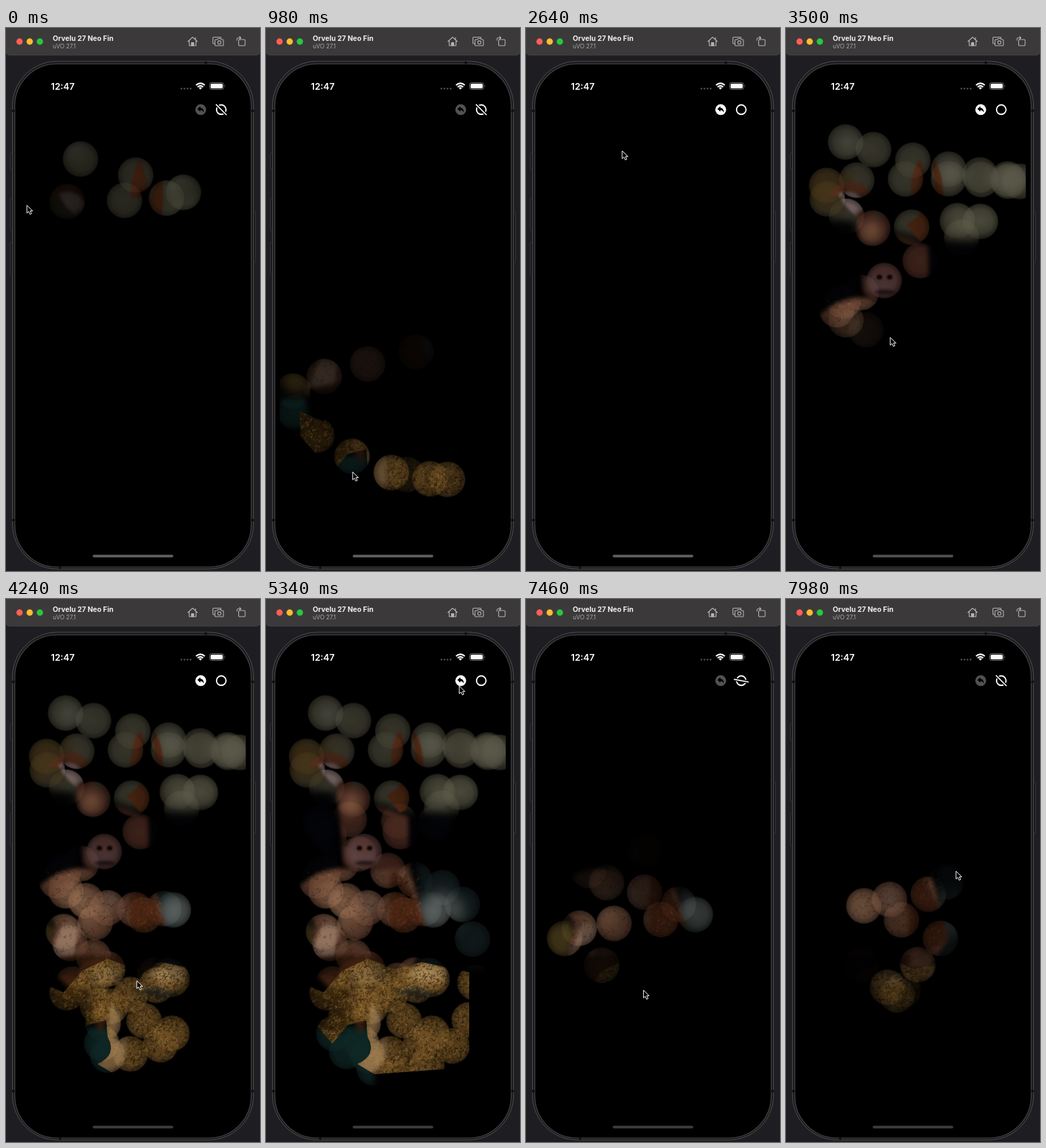
These frames come from a looping animation (375 by 800 pixels, 8 s). An HTML page with a canvas:

```html
<!DOCTYPE html>
<html lang="en">
<head>
<meta charset="utf-8">
<title>Reveal by touch</title>
<style>
  html, body { margin: 0; width: 100%; height: 100%; overflow: hidden; background: #1e1d21; }
  #stage { position: relative; width: 375px; height: 800px; overflow: hidden; }
  #stage > * { position: absolute; left: 0; top: 0; }
  text { font-family: Inter, "Open Sans", sans-serif; }
</style>
</head>
<body>
<div id="stage">
  <svg width="375" height="800" fill="none">
    <rect width="375" height="800" fill="#1e1d21"/>
    <path d="M0 0H375V34Q375 40 369 40H6Q0 40 0 34Z" fill="#3b393a"/>
    <path d="M0 34Q0 40 6 40H369Q375 40 375 34" stroke="#4b494b" stroke-width=".7"/>
    <circle cx="20" cy="20" r="4.7" fill="#ff5f57"/>
    <circle cx="35" cy="20" r="4.7" fill="#febc2e"/>
    <circle cx="50" cy="20" r="4.7" fill="#28c840"/>
    <text x="69" y="18.6" font-size="10.4" font-weight="700" fill="#f0efef">Orvelu 27 Neo Fin</text>
    <text x="69" y="29.6" font-size="8.6" fill="#aaa8a9">uVO 27.1</text>
    <g stroke="#b5b3b4" stroke-width="1.1" stroke-linejoin="round" stroke-linecap="round">
      <path d="M268.5 20L275.5 13.5L282.5 20M270.5 18.5V26H280.5V18.5M279.8 14V17"/>
      <rect x="273.8" y="21.5" width="3.4" height="4.5" fill="#b5b3b4"/>
      <path d="M308 23H306.5Q305.5 23 305.5 22V14.5Q305.5 13.5 306.5 13.5H316.5Q317.5 13.5 317.5 14.5V15"/>
      <path d="M309.5 17H312L313 15.5H317L318 17H320Q321 17 321 18V25Q321 26 320 26H309.5Q308.5 26 308.5 25V18Q308.5 17 309.5 17Z"/>
      <circle cx="315" cy="21.3" r="2.4"/>
      <rect x="343.5" y="17" width="9.5" height="9" rx="1.3"/>
      <path d="M341 18V16.5Q341 14.5 343 14.5H346.5M344.8 12.5L346.8 14.5L344.8 16.5"/>
    </g>
    <g fill="#19181b" stroke="#3d3c40" stroke-width=".8">
      <rect x="6.5" y="184" width="4" height="24" rx="1"/>
      <rect x="6.5" y="251" width="4" height="47" rx="1"/>
      <rect x="6.5" y="316" width="4" height="47" rx="1"/>
      <rect x="364.5" y="270" width="4" height="75" rx="1"/>
    </g>
    <rect x="9.5" y="49" width="356" height="748" rx="66" fill="#232325" stroke="#4d4c4f"/>
    <rect x="11" y="50.5" width="353" height="745" rx="64.5" stroke="#161617"/>
    <rect x="13" y="53" width="349" height="741" rx="62" fill="#000" stroke="#444346" stroke-width="1.2"/>
    <path d="M9 122H13M362 122H366M9 725H13M362 725H366M295 49V53M80 793V797" stroke="#0e0e0f" stroke-width="3"/>
  </svg>
  <canvas id="view" width="375" height="800"></canvas>
  <svg width="375" height="800" fill="none">
    <text x="66.2" y="90.7" font-size="13.5" font-weight="600" fill="#fff">12:47</text>
    <path d="M259 89.3H274" stroke="#4c4c4c" stroke-width="2.8" stroke-linecap="round" stroke-dasharray="0 4.5"/>
    <g stroke="#fff" stroke-width="2">
      <path d="M280.5 84.3Q287 78.4 293.5 84.3M282.9 86.9Q287 83.3 291.1 86.9"/>
      <path d="M284.6 88.3Q287 86.3 289.4 88.3L287 90.7Z" fill="#fff" stroke="none"/>
    </g>
    <rect x="300.5" y="80.5" width="21" height="10" rx="3.2" stroke="#777"/>
    <rect x="302" y="82" width="18" height="7" rx="2" fill="#fff"/>
    <path d="M323 84V87.2Q324.3 85.6 323 84Z" fill="#777"/>
    <circle id="undo" cx="287.5" cy="120.3" r="8"/>
    <path d="M282.5 119.2L287 115.2V117.5Q292 118 292 124.3Q290 121 287 121V123.3Z" fill="#000"/>
    <g id="toggle">
      <circle cx="317.8" cy="120.3" r="7" stroke="#fff" stroke-width="1.9"/>
      <g id="slash">
        <path d="M-8.5 0H8.5" stroke="#000" stroke-width="4.4"/>
        <path d="M-10.5 0H10.5" stroke="#fff" stroke-width="1.6" stroke-linecap="round"/>
      </g>
    </g>
    <rect id="bar" x="128" y="776" width="119" height="4" rx="2"/>
    <path id="cursor" d="M0 0V11.5L2.7 9.1L4.6 13.3L6.8 12.3L4.9 8.3H8.5Z" fill="#000" stroke="#fff" stroke-linejoin="round"/>
  </svg>
</div>
<script>
const LOOP = 8000, RADIUS = 27;
const el = id => document.getElementById(id);
const clamp = v => Math.min(1, Math.max(0, v));
const ramp = (t, a, b) => clamp((t - a) / (b - a));
const smooth = v => v * v * (3 - 2 * v);
const grey = v => `rgb(${v},${v},${v})`;

// The pointer sweeps through turning points, `leg` ms apart, and drops `drops` spots on each leg.
const strokes = [
  { start: -294, leg: 98, drops: 2, path:
    '110,193 262,242 175,254 31,261 150,300 290,310 110,380 260,455 150,495 40,535 75,600 185,655 268,665 129,654 60,690 250,690 290,600' },
  { start: 2755, leg: 82.5, drops: 3, keep: true, path:
    '88,168 240,208 345,226 240,222 60,232 128,295 287,285 145,372 75,415 150,455 247,458 85,490 150,545 90,580 245,640 150,672 155,600 245,560 194,562 100,640 200,700 300,620 290,450 180,400 80,330 250,330' },
  { start: 6524, leg: 104, drops: 2, path:
    '120,190 280,220 80,290 250,340 92,400 175,432 250,465 130,478 57,500 173,576 150,572 228,500 115,452 210,435 251,401' }
].map(s => ({ ...s, keys: s.path.split(' ').map(p => p.split(',').map(Number)) }));

function along({ keys, start, leg }, t) {
  const last = keys.length - 1, pos = Math.min(last, Math.max(0, (t - start) / leg));
  const i = Math.min(last - 1, Math.floor(pos)), u = pos - i;
  const [p, a, b, n] = [i - 1, i, i + 1, i + 2].map(k => keys[Math.min(last, Math.max(0, k))]);
  return [0, 1].map(c => a[c] + u / 2 * (b[c] - p[c] +
    u * (2 * p[c] - 5 * a[c] + 4 * b[c] - n[c] + u * (3 * (a[c] - b[c]) + n[c] - p[c]))));
}
const endOf = s => s.start + s.leg * (s.keys.length - 1);

const spots = strokes.flatMap(s =>
  Array.from({ length: (s.keys.length - 1) * s.drops + 1 }, (_, i) => {
    const t = s.start + i * s.leg / s.drops;
    return { t, at: along(s, t), keep: s.keep };
  }));

// Between strokes the pointer rests on a button or glides to the next stop.
const undoAt = [287, 118], toggleAt = [316, 117];
const stops = [
  ...strokes.flatMap(s => [[s.start, s.keys[0]], [endOf(s), s.keys.at(-1)]]),
  [1900, toggleAt], [2150, toggleAt], [2640, [142, 181]],
  [5420, undoAt], [5850, undoAt], [6150, toggleAt], [6420, toggleAt]
].sort((a, b) => a[0] - b[0]);

function pointerAt(t) {
  const stroke = strokes.find(s => t >= s.start && t <= endOf(s));
  if (stroke) return along(stroke, t);
  const i = stops.findIndex(s => s[0] > t);
  const [[t0, a], [t1, b]] = i < 0 ? [stops.at(-1), stops.at(-1)] : [stops[i - 1], stops[i]];
  const u = smooth(ramp(t, t0, t1 + (i < 0)));
  return a.map((v, c) => v + (b[c] - v) * u);
}

function paintPhoto() {
  const cv = document.createElement('canvas');
  cv.width = 375; cv.height = 800;
  const g = cv.getContext('2d');
  const shape = (d, fill, blur = 2) => {
    g.filter = `blur(${blur}px)`;
    g.fillStyle = fill;
    g.fill(new Path2D(d));
    g.filter = 'none';
  };
  const oval = (x, y, rx, ry, fill, blur) =>
    shape(`M${x - rx} ${y}a${rx} ${ry} 0 1 0 ${2 * rx} 0a${rx} ${ry} 0 1 0 ${-2 * rx} 0`, fill, blur);
  let seed = 7;
  const rnd = () => (seed = seed * 16807 % 2147483647) / 2147483647;
  const fur = (x0, y0, w, h, count, size, colors) => {
    g.lineWidth = 1.2;
    for (let i = 0; i < count; i++) {
      const x = x0 + rnd() * w, y = y0 + rnd() * h, a = rnd() * 6.3;
      g.strokeStyle = colors[i % colors.length];
      g.beginPath();
      g.moveTo(x, y);
      g.quadraticCurveTo(x + 2, y - 2, x + size * Math.cos(a), y + size * Math.sin(a));
      g.stroke();
    }
  };

  // Backdrop
  shape('M0 100H375V305Q250 330 180 305L80 285H0Z', '#504e3e', 7);
  oval(55, 235, 45, 36, '#54401f', 12);
  oval(95, 172, 20, 18, '#68675a', 10);
  oval(245, 215, 22, 20, '#6b6a5a', 10);
  oval(280, 280, 45, 24, '#6e6c57', 10);
  oval(330, 222, 30, 24, '#6b6957', 10);
  shape('M0 288H105V405H0ZM210 318H375V395H210Z', '#04050a', 9);
  shape('M225 385H375V540H225Z', '#182427', 7);
  oval(258, 462, 34, 30, '#6c7472', 10);
  oval(47, 505, 28, 34, '#75602c', 9);
  shape('M0 545H60L65 590H0ZM0 630H160V720H0Z', '#12302d', 4);
  // Ears and head
  shape('M62 247Q88 214 118 235Q135 255 128 278L112 278Q98 245 62 247Z', '#6b3a24', 1);
  shape('M78 244Q105 235 119 262L106 277Q88 268 78 244Z', '#b69a98', 2);
  shape('M184 250Q185 205 198 194Q210 220 208 250Z', '#6a381d', 1);
  shape('M216 192Q234 210 232 262Q225 305 198 315L178 290Q216 265 220 230Z', '#653319', 1);
  shape('M104 268Q120 282 163 272L150 300L210 320L212 400Q165 430 115 390Z', '#593226', 3);
  oval(125, 300, 18, 18, '#a06a4e', 8);
  oval(144, 372, 26, 26, '#6f5150', 6);
  oval(146, 363, 16, 13, '#6e4540', 3);
  oval(138, 367, 4, 3.5, '#120909', 1);
  oval(153, 367, 4, 3.5, '#120909', 1);
  oval(146, 389, 15, 3, '#2a1516', 2);
  // Chest
  shape('M40 430Q90 385 140 402L210 395L222 430L238 500L214 545H78L55 530L75 480L52 455Z', '#7d513c', 3);
  oval(108, 453, 28, 36, '#bd8a68', 14);
  shape('M84 478L108 480L100 530L58 540Z', '#b58f76', 2);
  shape('M185 400Q212 405 240 505L205 520L180 490Z', '#5e2f18', 3);
  oval(153, 440, 14, 26, '#94705c', 8);
  shape('M55 535Q100 518 185 525L180 548L150 552L165 590L140 640L110 590Z', '#482614', 3);
  fur(60, 400, 170, 130, 900, 4, ['rgba(40,18,8,.22)', 'rgba(220,170,130,.14)']);
  // Blanket
  g.save();
  g.clip(new Path2D('M50 565L85 580L112 548L150 530L190 545L230 535L300 550V690L160 700L135 685Q165 672 150 645L148 620L120 628L98 655L50 600Z'));
  shape('M40 520H310V720H40Z', '#8a632c', 0);
  shape('M40 560L118 575L135 640H40Z', '#4d3412', 5);
  shape('M185 578L222 570L265 584L230 592Z', '#39382c', 3);
  oval(240, 552, 30, 13, '#c4a068', 6);
  oval(150, 555, 28, 14, '#a98550', 7);
  fur(50, 530, 250, 175, 4200, 4, ['rgba(48,27,5,.5)', 'rgba(205,162,88,.4)', 'rgba(70,42,10,.45)']);
  shape('M156 595Q180 620 178 645Q184 690 145 705L130 685Q160 670 148 640Z', 'rgba(202,160,110,.75)', 3);
  g.restore();
  // Low exposure
  g.fillStyle = 'rgba(0,0,0,.14)';
  g.fillRect(0, 0, 375, 800);
  return cv;
}

const photo = paintPhoto();
const ctx = el('view').getContext('2d');
const soft = ctx.createRadialGradient(0, 0, 0, 0, 0, RADIUS);
soft.addColorStop(0, '#fff');
soft.addColorStop(.65, '#ffffffe0');
soft.addColorStop(.93, '#ffffff98');
soft.addColorStop(1, '#fff0');

function strength(spot, t) {
  const age = t - spot.t;
  if (age <= 0) return 0;
  const fadeIn = smooth(ramp(age, 0, 120));
  if (spot.keep) return fadeIn * (1 - smooth(ramp(t, 5720, 6020)));
  return .85 * fadeIn * (1 - ramp(age, 200, 590) ** 1.5);
}

function drawReveal(t) {
  ctx.clearRect(0, 0, 375, 800);
  ctx.save();
  ctx.beginPath();
  ctx.rect(20, 54, 334, 738);
  ctx.clip();
  ctx.fillStyle = soft;
  for (const spot of spots) {
    const power = strength(spot, t);
    if (power <= 0) continue;
    ctx.globalAlpha = .78 * power;
    ctx.setTransform(1, 0, 0, 1, ...spot.at);
    ctx.fillRect(-RADIUS, -RADIUS, 2 * RADIUS, 2 * RADIUS);
  }
  ctx.setTransform(1, 0, 0, 1, 0, 0);
  ctx.globalAlpha = 1;
  ctx.globalCompositeOperation = 'source-in';
  ctx.drawImage(photo, 0, 0);
  ctx.restore();
}

function drawControls(t) {
  const off = smooth(ramp(t, 2100, 2450)), on = ramp(t, 6520, 7900);
  const angle = t < 6500 ? 45 + 90 * off : 45 - 340 * (1 - on) ** 2;
  const shown = t < 6500 ? 1 - off : smooth(ramp(t, 6520, 6800));
  el('slash').setAttribute('transform', `translate(317.8 120.3) rotate(${angle}) scale(${shown} 1)`);
  el('slash').setAttribute('opacity', shown);
  const pressed = (t > 2000 && t < 2120) || (t > 6360 && t < 6500);
  el('toggle').setAttribute('opacity', pressed ? .5 : 1);
  const active = ramp(t, 2120, 2300) - ramp(t, 6500, 6680);
  el('undo').setAttribute('fill', grey(82 + 173 * active));
  el('undo').setAttribute('opacity', t > 5720 && t < 5840 ? .5 : 1);
  el('bar').setAttribute('fill', grey(90 - 32 * ramp(t, 3100, 4100)));
  el('cursor').setAttribute('transform', `translate(${pointerAt(t)})`);
}

function frame() {
  const t = performance.now() % LOOP;
  drawReveal(t);
  drawControls(t);
  requestAnimationFrame(frame);
}
frame();
</script>
</body>
</html>
```
